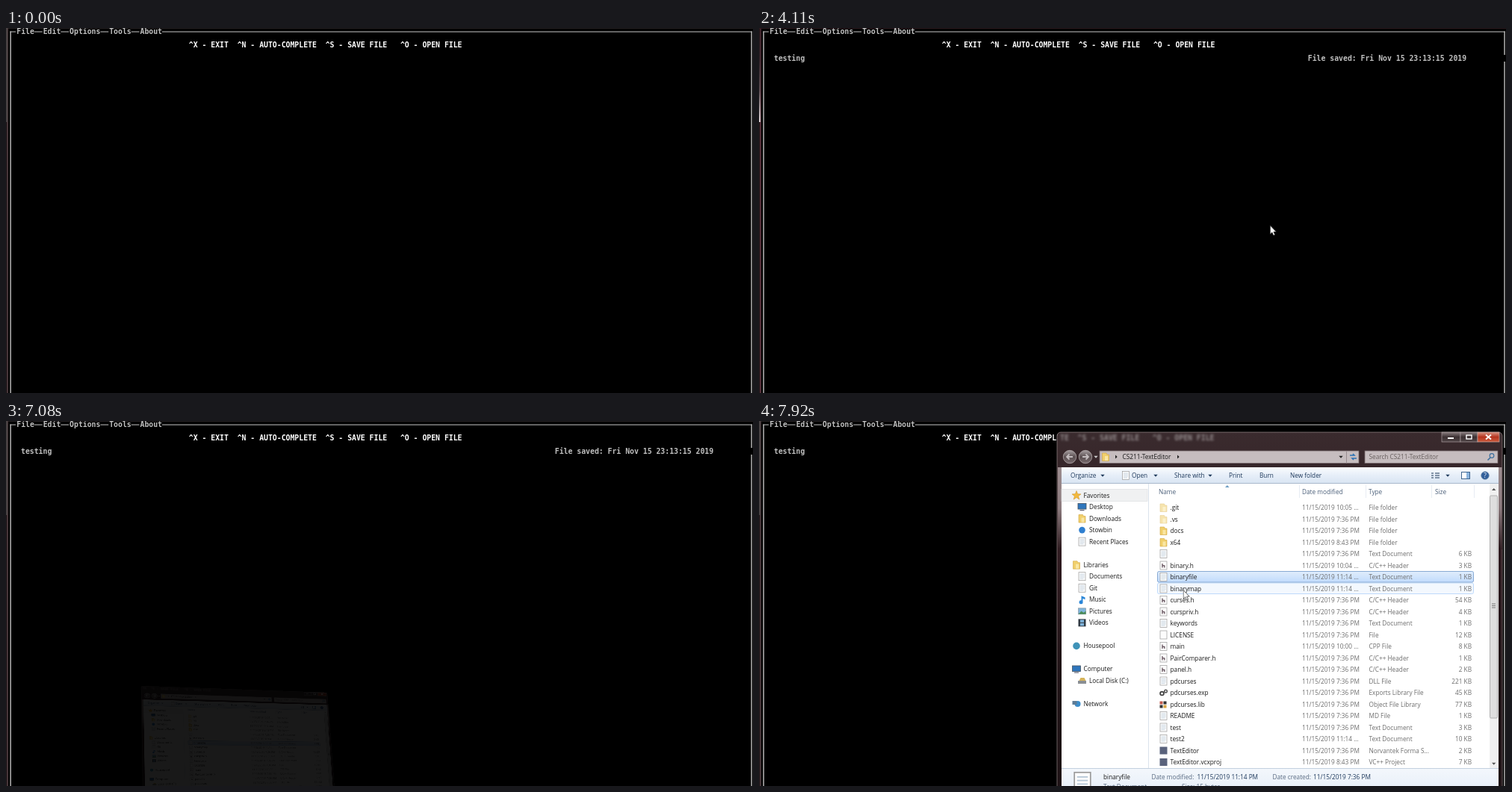
These frames come from a looping animation (1000x489 px, 8 s). An HTML page:

```html
<!DOCTYPE html>
<html lang="en">
<head>
<meta charset="utf-8">
<title>Console text editor</title>
<style>
html, body { margin: 0; width: 100%; height: 100%; overflow: hidden; background: #000; }
svg { position: absolute; left: 0; top: 0; }
text { white-space: pre; }
#console text { font: 700 9.8px "DejaVu Sans Mono", monospace; }
#win { transform-origin: 0 0; overflow: visible; }
#win text { font: 8.25px "Open Sans", "Noto Sans", sans-serif; }
#win .behind { font: 700 9.8px "DejaVu Sans Mono", monospace; }
</style>
</head>
<body>
<svg id="console" width="1000" height="489"></svg>
<svg id="win" width="596" height="474" viewBox="399 15 596 474"></svg>
<svg id="cursor" width="14" height="18"><path d="M.6 .6V12.2L3.2 9.8L5 14L7 13.1L5.2 9.1H8.7Z" fill="#fff" stroke="#222" stroke-width=".7"/></svg>
<script>
const $ = id => document.getElementById(id);
const text = (x, y, s, fill, more = '') => `<text x="${x}" y="${y}" fill="${fill}" ${more}>${s}</text>`;
const rect = (x, y, w, h, fill, more = '') => `<rect x="${x}" y="${y}" width="${w}" height="${h}" fill="${fill}" ${more}/>`;
const circle = (x, y, r, fill, more = '') => `<circle cx="${x}" cy="${y}" r="${r}" fill="${fill}" ${more}/>`;
const path = (d, fill, more = '') => `<path d="${d}" fill="${fill}" ${more}/>`;
const grad = (id, ...stops) => `<linearGradient id="${id}" x2="0" y2="1">${
  stops.map((c, i) => `<stop offset="${i / (stops.length - 1)}" stop-color="${c}"/>`).join('')}</linearGradient>`;

// Console
const CELL = 5.9, GREY = '#c0c0c0', EDGE = '#b4b4b4';
const menu = [['File', 0], ['Edit', 6], ['Options', 12], ['Tools', 21], ['About', 28]];
const menuX = col => 14.3 + col * CELL;
const topLine = (x, end) => rect(x, 4.5, end - x, 1.1, EDGE);
$('console').innerHTML =
  '<defs>' + grad('glow', '#2a1a1e', '#33242a', '#5a4a4f', '#d8ccd0') + '</defs>' +
  rect(0, 0, 1000, 1, '#242021') +
  rect(0, 0, 1, 489, '#1c1416') + rect(1, 0, 2, 489, '#463639') + rect(0, 0, 2, 126, '#484243') +
  `<g id="focus">${rect(1, 0, 2, 489, '#55303a')}${rect(0, 0, 2, 126, 'url(#glow)')}${rect(0, 0, 1000, 1, '#2c1a1f')}</g>` +
  rect(5.4, 4.5, 1.5, 485, EDGE) + rect(997.3, 4.5, 1.5, 485, EDGE) + topLine(5.4, 13) +
  menu.map(([word, col], i) => {
    const next = menu[i + 1];
    return text(menuX(col), 8.3, word, GREY) +
      topLine(menuX(col + word.length), next ? menuX(next[1]) - 1 : 998.8);
  }).join('') +
  text(244.8, 26, '^X - EXIT  ^N - AUTO-COMPLETE  ^S - SAVE FILE   ^O - OPEN FILE', '#fff') +
  text(20, 44, '', GREY, 'id="typed"') +
  `<g id="saved">${rect(735, 36, 265, 9, '#000')}${text(734.8, 44, 'File saved: Fri Nov 15 23:13:15 2019', GREY)}</g>`;

// File window
const ROW = 15.5, INK = '#1b1b1b', DIM = '#6d6d6d', NAVY = '#1e395b';
const files = `.git|10:05 ...|File folder||dir
.vs|7:36 PM|File folder||dir
docs|7:36 PM|File folder||dir
x64|8:43 PM|File folder||dir
|7:36 PM|Text Document|6|doc
binary.h|10:04 ...|C/C++ Header|3|head
binaryfile|11:14 ...|Text Document|1|doc
binarymap|11:14 ...|Text Document|1|doc
curses.h|7:36 PM|C/C++ Header|54|head
curspriv.h|7:36 PM|C/C++ Header|4|head
keywords|7:36 PM|Text Document|1|doc
LICENSE|7:36 PM|File|12|page
main|10:00 ...|CPP File|8|head
PairComparer.h|7:36 PM|C/C++ Header|1|head
panel.h|7:36 PM|C/C++ Header|2|head
pdcurses|7:36 PM|DLL File|221|doc
pdcurses.exp|7:36 PM|Exports Library File|45|gear
pdcurses.lib|7:36 PM|Object File Library|77|lib
README|7:36 PM|MD File|1|doc
test|7:36 PM|Text Document|3|doc
test2|11:14 ...|Text Document|10|doc
TextEditor|7:36 PM|Norvantek Forma S...|2|app
TextEditor.vcxproj|8:43 PM|VC++ Project|7|app`.split('\n').map(line => line.split('|'));

// Navigation entries: label, slot, icon; an upper-level entry has a fourth value
const nav = [['Favorites', 0, 'star', 1], ['Desktop', 1, 'screen'], ['Downloads', 2, 'dir'], ['Stowbin', 3, 'dot'],
  ['Recent Places', 4, 'doc'], ['Libraries', 6, 'dir', 1], ['Documents', 7, 'doc'], ['Git', 8, 'doc'], ['Music', 9, 'note'],
  ['Pictures', 10, 'photo'], ['Videos', 11, 'film'], ['Housepool', 13, 'ball', 1], ['Computer', 15, 'screen', 1],
  ['Local Disk (C:)', 16, 'disk'], ['Network', 18, 'globe', 1]];

const page = rect(-4.5, -5.5, 9, 11, '#fcfcfc', 'stroke="#9a9a9a" stroke-width=".7"');
const lines = path('M-3-3H3M-3-1H3M-3 1H3M-3 3H2', 'none', 'stroke="#b4c6d6" stroke-width=".7"');
const screen = rect(-5.5, -4.5, 11, 7.5, '#2f76bd', 'stroke="#44525e" stroke-width=".8"') + rect(-3, 4, 6, 1.2, '#667');
const icons = {
  page, screen,
  doc: page + lines,
  head: page + path('M-1.5-2.5V3M-1.5 .3H1.3V3', 'none', 'stroke="#4a3440" stroke-width="1.1"'),
  dir: path('M-4.5-5H1L2-3H4.5V5.5H-4.5Z', '#f0cf6c', 'stroke="#d0a540" stroke-width=".6"') + rect(-1, -1, 4, 6, '#f9e6a4'),
  gear: circle(-2, 1, 2.4, 'none', 'stroke="#444" stroke-width="1.8"') + circle(3, -2, 1.8, 'none', 'stroke="#555" stroke-width="1.5"'),
  lib: rect(-5, -4, 4, 4, '#c25b4c') + rect(0, -4, 4, 4, '#333') + rect(-5, 1, 4, 4, '#333') + rect(0, 1, 4, 4, '#d9a441'),
  app: rect(-5, -5, 10, 10, '#59627c'),
  star: path('M0-6L1.6-1.8L6-1.6L2.6 1.2L3.8 5.6L0 3L-3.8 5.6L-2.6 1.2L-6-1.6L-1.6-1.8Z', '#f3b93c', 'stroke="#c98a1c" stroke-width=".5"'),
  dot: circle(0, 0, 4.3, '#2f7fd0'),
  ball: circle(0, 0, 4.8, '#3f93b8'),
  note: path('M-1-5L4-3V0L1-1.5V3A2.5 2.5 0 1 1-1 1Z', '#2a86d8'),
  photo: rect(-5, -4, 10, 8, '#7fb5dc', 'stroke="#8a98a4" stroke-width=".7"') + path('M-5 4L-1 0L2 2L5 0V4Z', '#4c8c58'),
  film: rect(-5, -5, 10, 10, '#303a44') + rect(-2.5, -4, 5, 3.5, '#7fb4dc') + rect(-2.5, .5, 5, 3.5, '#7fb4dc'),
  disk: rect(-5.5, 0, 11, 4, '#8a8f94') + path('M-4 0L-2-4H3L5 0Z', '#d5b35a'),
  globe: circle(1.5, 0, 4, '#3d8ecb') + rect(-5.5, -4, 6, 5, '#5d7c96')
};
const icon = (kind, x, y, more = '') => `<g transform="translate(${x} ${y})" ${more}>${icons[kind]}</g>`;
const arrow = (x, y, fill = NAVY) => path(`M${x - 2.7} ${y - 1.3}h5.4l-2.7 3Z`, fill);
const rightArrow = (x, y) => path(`M${x} ${y - 2.5}v5l2.7-2.5Z`, '#222');
const rowRect = (id, row, fill, edge) =>
  rect(533.5, 201.5 + (row - 6) * ROW, 423, 14.5, fill, `id="${id}" rx="2" stroke="${edge}" stroke-width=".9"`);
const rowY = i => 116 + i * ROW;

const glass =
  rect(399, 15, 596, 500, 'url(#glass)', 'rx="5" stroke="#b5a6a8" stroke-opacity=".7" stroke-width=".8"') +
  rect(400, 62, 5, 110, 'url(#side)') + rect(990, 62, 4.5, 110, 'url(#side)') +
  text(403, 26, 'TE  ^S - SAVE FILE   ^O - OPEN FILE', '#fff', 'class="behind" filter="url(#blur)" opacity=".45"') +
  rect(914, 15, 25, 13, 'url(#button)', 'stroke="#a89c9e" stroke-width=".7"') +
  rect(939, 15, 23, 13, 'url(#button)', 'stroke="#a89c9e" stroke-width=".7"') +
  rect(962, 15, 29, 13, 'url(#close)', 'stroke="#c9a8a4" stroke-width=".7"') +
  rect(922, 22, 8, 2, '#fff') + rect(947, 19, 7, 5, 'none', 'stroke="#fff" stroke-width="1.4"') +
  path('M973 18.5L980 24.5M980 18.5L973 24.5', 'none', 'stroke="#fff" stroke-width="1.9"') +
  [416, 437].map(x => circle(x, 48, 8.7, 'url(#round)', 'stroke="#b0a6a8" stroke-width=".8"')).join('') +
  path('M420 48H412M415.5 44.5L412 48L415.5 51.5M433 48H441M437.5 44.5L441 48L437.5 51.5', 'none', 'stroke="#c3bcbe" stroke-width="1.8"') +
  arrow(451, 48, '#ccc');

const bars =
  rect(456, 40, 347, 16.5, '#c6bdbf', 'stroke="#786a6d" stroke-width=".8"') + rect(786, 40.5, 1, 16, '#998d90') +
  icon('dir', 464, 48) + rightArrow(477, 48) + text(486.5, 51, 'CS211-TextEditor', INK) + rightArrow(560, 48) +
  arrow(779, 48, '#222') + path('M791 46h6l-2-2M800 50h-6l2 2', 'none', 'stroke="#2a72b5" stroke-width="1.5"') +
  rect(811, 40, 178, 16.5, '#c6bdbf', 'stroke="#786a6d" stroke-width=".8"') +
  text(816.5, 51, 'Search CS211-TextEditor', '#68605f', 'font-style="italic"') +
  circle(981, 46.5, 2.8, 'none', 'stroke="#3c6f9e" stroke-width="1.2"') + path('M979 49L975.5 52.5', 'none', 'stroke="#3c6f9e" stroke-width="1.6"') +
  rect(405, 62, 585, 22, 'url(#tool)') + rect(405, 83, 585, 1, '#a9b9cc') +
  [['Organize', 417], ['Open', 499], ['Share with', 556], ['Print', 629], ['Burn', 670], ['New folder', 711]]
    .map(([s, x]) => text(x, 76, s, NAVY)).join('') +
  arrow(460, 73) + arrow(531, 73) + arrow(604, 73) + arrow(922, 73) + icon('doc', 491, 73) +
  path('M900 70h3M900 73h3M900 76h3M905 70h6M905 73h6M905 76h6', 'none', 'stroke="#60748c" stroke-width="1.5"') +
  rect(940.5, 68.5, 11, 9, '#fff', 'stroke="#40668f"') + rect(947, 69, 4, 8, '#8cb5df') +
  circle(972, 73, 5.3, '#315f9b', 'stroke="#7892ac" stroke-width=".7"') + text(970.2, 76, '?', '#fff', 'font-weight="700"');

const navPane =
  rect(405, 91.5, 115, 16, '#f0f1f2', 'stroke="#dedfe1" stroke-width=".7"') + rect(521, 84, 1, 382, '#dbe3ec') +
  nav.map(([s, slot, kind, top]) => {
    const y = 99.5 + slot * 15.53;
    return icon(kind, top ? 425 : 432.5, y) + text(top ? 434.5 : 442, y + 3, s, INK);
  }).join('');

const list =
  [['Name', 535], ['Date modified', 727], ['Type', 816], ['Size', 905]].map(([s, x]) => text(x, 97.5, s, '#4c607a')).join('') +
  [723, 812, 900, 957].map(x => rect(x, 86, .8, 17, '#e2e8f0')).join('') +
  path('M624 89l2.8-3 2.8 3Z', '#6c9dc4') +
  rowRect('hover', 7, '#f3f8fe', '#b8d6fb') + rowRect('picked', 6, 'url(#pick)', '#7da2ce') +
  files.map(([name, time, type, size, kind], i) => {
    const y = rowY(i);
    return icon(kind, 541.5, y, i < 2 ? 'opacity=".55"' : '') + text(550.5, y + 3, name, INK) +
      text(727, y + 3, '11/15/2019 ' + time, DIM) + text(816.5, y + 3, type, DIM) +
      (size && text(954, y + 3, size + ' KB', DIM, 'text-anchor="end"'));
  }).join('');

const rest =
  rect(978, 84, 12, 382, '#f0f0f0') + rect(978.5, 100, 10, 298, '#dedede', 'rx="1.5" stroke="#a4a4a4" stroke-width=".8"') +
  path('M981 245h5M981 247.5h5M981 250h5', 'none', 'stroke="#777"') +
  path('M981 93l2.7-3 2.7 3Z', '#555') + arrow(983.7, 459, '#555') +
  rect(405, 466, 585, 40, 'url(#info)') + rect(405, 465, 585, 1, '#c3d0df') +
  `<g transform="translate(433 484) scale(2.4)">${icons.doc}</g>` +
  text(461, 480, 'binaryfile', INK) + text(525.5, 480, 'Date modified:', '#5a6b82') + text(586.5, 480, '11/15/2019 11:14 PM', NAVY) +
  text(687.5, 480, 'Date created:', '#5a6b82') + text(742, 480, '11/15/2019 7:36 PM', NAVY) +
  text(461, 492.5, 'Text Document', '#5a6b82') + text(566, 492.5, 'Size: 15 bytes', '#5a6b82');

$('win').innerHTML = '<defs><filter id="blur"><feGaussianBlur stdDeviation="1.8"/></filter>' +
  grad('glass', '#3a2b2e', '#2e1a1f', '#1d1114', '#1d1114') + grad('side', '#9c8d90', '#8b7a7d', '#2c1a1e') +
  grad('button', '#8a7e80', '#3c3133', '#4f4446') + grad('close', '#d99584', '#b5341f', '#cb5a3c') +
  grad('round', '#a79fa1', '#5b5052', '#77696c') + grad('tool', '#fafcfe', '#e6eef8', '#d8e4f2') +
  grad('pick', '#e0edfc', '#c1dbfc') + grad('info', '#f3f7fc', '#e3ecf7') + '</defs>' +
  glass + bars + rect(405, 84, 585, 382, '#fff') + navPane + list + rest;

// Projects the window onto four corners, clockwise from the top left
function project([x0, y0, x1, y1, x2, y2, x3, y3], w = 596, h = 474) {
  const ax = x1 - x2, ay = y1 - y2, bx = x3 - x2, by = y3 - y2;
  const sx = x0 - x1 + x2 - x3, sy = y0 - y1 + y2 - y3, det = ax * by - bx * ay;
  const g = (sx * by - bx * sy) / det, k = (ax * sy - sx * ay) / det;
  return `matrix3d(${[
    (x1 - x0 + g * x1) / w, (y1 - y0 + g * y1) / w, 0, g / w,
    (x3 - x0 + k * x3) / h, (y3 - y0 + k * y3) / h, 0, k / h,
    0, 0, 1, 0, x0, y0, 0, 1]})`;
}

const poses = [
  { from: 7080, alpha: .1, shape: project([181, 355, 430, 364, 443, 536, 184, 545]) },
  { from: 7160, alpha: .39, shape: project([245, 267, 538.5, 274, 549.5, 492, 247, 497]) },
  { from: 7230, alpha: 1, shape: 'translate(399px, 15px)' }
];

const easeOut = s => 1 - (1 - s) ** 2, easeIn = s => s ** 1.6;
const moves = [
  { from: 70, to: 520, steps: 7, end: 5500, ease: easeOut, x: [838, 750, 683.7], y: [404, 300, 264] },
  { from: 5500, to: 6050, steps: 8, end: 6050, ease: easeIn, x: [682.5, 705, 550], y: [276, 350, 489] },
  { from: 7460, to: 7920, steps: 7, end: 8000, ease: easeOut, x: [377, 480, 567.5], y: [464, 300, 226] }
];
const bend = ([a, b, c], s) => a * (1 - s) ** 2 + 2 * b * s * (1 - s) + c * s * s;

function pointer(t) {
  const m = moves.find(m => t >= m.from && t < m.end);
  if (!m) return null;
  const last = m.steps - 1;
  const step = Math.min(last, Math.floor((t - m.from) / (m.to - m.from) * last + .01));
  const s = m.ease(step / last);
  return { x: bend(m.x, s), y: bend(m.y, s) };
}

const keys = [1840, 2080, 2230, 2460, 2630, 2780, 2890];
const show = (id, on) => $(id).style.visibility = on ? 'visible' : 'hidden';

function draw(t) {
  $('typed').textContent = 'testing'.slice(0, keys.filter(k => t >= k).length);
  $('focus').style.opacity = t < 840 || t >= 6840 ? 0 : t < 930 ? .5 : 1;
  show('saved', t >= 4110);

  const pose = poses.filter(p => t >= p.from).pop();
  $('win').style.display = pose ? '' : 'none';
  if (pose) {
    $('win').style.transform = pose.shape;
    $('win').style.opacity = pose.alpha;
  }

  const p = pointer(t);
  show('cursor', p);
  if (p) $('cursor').style.transform = `translate(${p.x}px, ${p.y}px)`;
  const row = p && t >= 7460 && p.x > 533 ? Math.round((p.y - rowY(0)) / ROW) : -1;
  $('hover').style.display = row < 0 ? 'none' : '';
  $('hover').setAttribute('y', 201.5 + (row - 6) * ROW);
}

const start = performance.now();
(function tick() {
  draw((performance.now() - start) % 8000);
  requestAnimationFrame(tick);
})();
</script>
</body>
</html>
```
